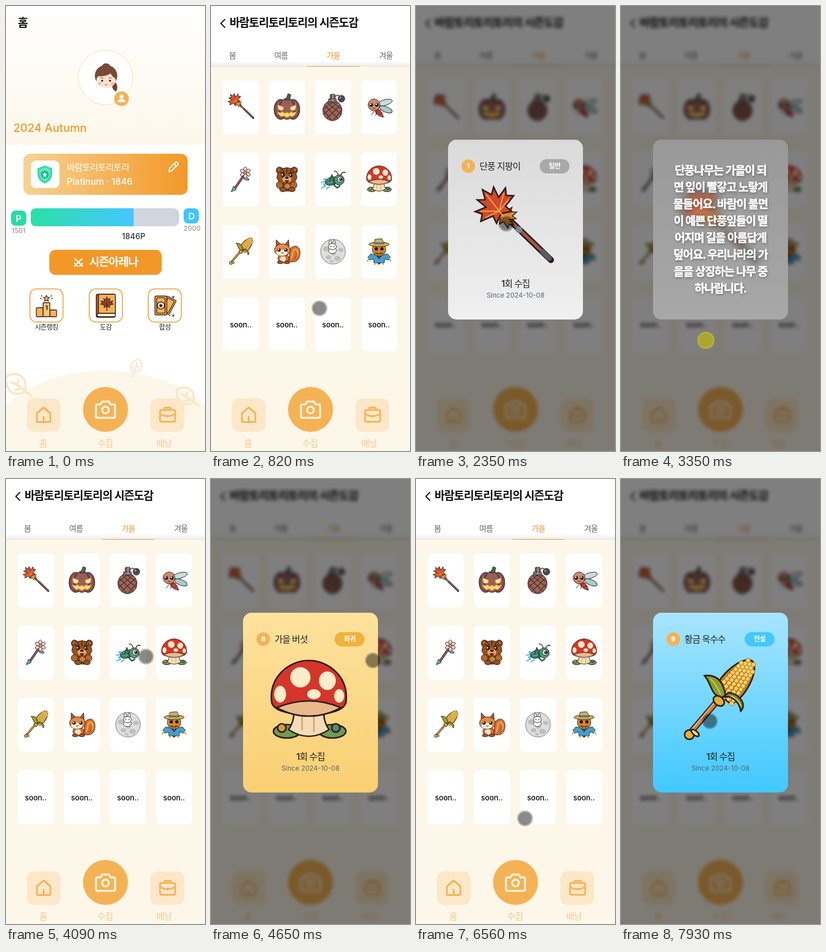
These frames come from a looping animation (354x792 px, 8 s). An HTML page:

```html
<!DOCTYPE html>
<html lang="ko">
<head>
<meta charset="utf-8">
<style>
html, body { margin: 0; width: 100%; height: 100%; overflow: hidden; background: #fff; }
body > * { position: absolute; left: 0; top: 0; width: 354px; height: 792px; }
text { font-family: Inter, "Noto Sans CJK KR", "Noto Sans CJK", sans-serif; white-space: pre; }
#dim { background: rgba(0,0,0,.5); backdrop-filter: blur(3px); }
#back text { stroke: #fff; stroke-width: .5px; filter: drop-shadow(1px 2px 2px rgba(0,0,0,.3)); }
</style>
</head>
<body>
<svg id="home"></svg>
<svg id="dex"></svg>
<div id="dim"></div>
<svg id="modal"></svg>
<svg id="touch"><g id="dot"><circle r="14"/><circle r="11.5"/></g></svg>
<script>
const $ = id => document.getElementById(id);
const INK = '#2b1a18', ORANGE = '#f39828', AMBER = '#f5b255', CREAM = '#fdf7ea';
const USER = '바람토리토리토리';

// ---- drawing helpers
const text = (x, y, s, size, fill, weight = 400, anchor = 'middle') =>
  `<text x="${x}" y="${y + size * .36}" font-size="${size}" fill="${fill}" font-weight="${weight}" text-anchor="${anchor}"${/[가-힣]/.test(s) ? ' letter-spacing="-.055em"' : ''}>${s}</text>`;
const rect = (x, y, w, h, r, fill, more = '') =>
  `<rect x="${x}" y="${y}" width="${w}" height="${h}" rx="${r}" fill="${fill}" ${more}/>`;
const oval = (x, y, rx, ry, fill, more = '') =>
  `<ellipse cx="${x}" cy="${y}" rx="${rx}" ry="${ry}" fill="${fill}" ${more}/>`;
const disc = (x, y, r, fill, more = '') => oval(x, y, r, r, fill, more);
const shape = (d, fill, more = '') => `<path d="${d}" fill="${fill}" ${more}/>`;
const line = (d, color, w = 1) =>
  `<path d="${d}" fill="none" stroke="${color}" stroke-width="${w}" stroke-linecap="round" stroke-linejoin="round"/>`;
const at = (x, y, s, k = 1, turn = 0) =>
  `<g transform="translate(${x} ${y}) scale(${k}) rotate(${turn})">${s}</g>`;
const ring = (n, f) => Array.from({ length: n }, (_, i) => f(i * 360 / n)).join('');
const gradient = (id, a, b, flat) =>
  `<linearGradient id="${id}" x2="${flat ? 1 : 0}" y2="${flat ? 0 : 1}"><stop stop-color="${a}"/><stop offset="1" stop-color="${b}"/></linearGradient>`;
const edge = `stroke="${INK}" stroke-width=".9"`;
const eyes = (x1, x2, y, r) => [x1, x2].map(x => disc(x, y, r, INK) + disc(x - r * .3, y - r * .35, r * .4, '#fff')).join('');

// ---- collectibles, each about 50 units wide around 0,0
const mapleLeaf = 'M0-13L2.500-7 6.500-10 5-3 12-5 9.500-1 13 2 5 4 6 9 0 6-6 9-5 4-13 2-9.500-1-12-5-5-3-6.500-10-2.500-7Z';

const cob = () => {
  let s = shape('M-13-6C-6-10 8-8 14-2.500Q16 0 14 2.500C8 8-6 10-13 6Z', '#c07f1a', edge);
  for (let i = -5; i <= 5; i++)
    for (let j = -3; j <= 3; j++) {
      const x = i * 2.5 + (j % 2 ? 1.2 : 0), y = j * (2.5 - i * .1);
      if (Math.abs(y) < 7.6 - (x + 13) ** 2 * .006) s += oval(x, y, 1.4, 1.3, '#f7d06a', 'stroke="#a86a12" stroke-width=".3"');
    }
  return s;
};

const items = [
  // maple staff
  line('M-7-9L22 19', INK, 3.6) + line('M-6-8L20 17', '#9a5a45', 1.8) + line('M17 14L21 18', '#5a5a68', 3) + disc(3, 1, 2, '#7d8590') +
  at(-5, -7, shape(mapleLeaf, '#e08b34', edge), .55, 70) + at(-11, -13, shape(mapleLeaf, '#cf4a28', edge) + line('M0-9V12M-9-3L0 4 9-3M-9 2L0 4 9 2', '#f09a4a', .8), .95, -38),
  // pumpkin
  oval(-11, 4, 12, 18, '#7b4c50', edge) + oval(11, 4, 12, 18, '#7b4c50', edge) + oval(0, 3, 13, 19, '#96605a', edge) + line('M-15-8Q-19 2-16 14M15-8Q19 2 16 14', '#b07a68', 1.4) +
  shape('M-4-13Q1-18 2-24L7-22Q5-17 6-13Z', '#3f6b45', edge) +
  shape('M-16-4L-6 0Q-5 6-11 6T-16-4ZM16-4L6 0Q5 6 11 6T16-4Z', '#fff0a0', 'stroke="#e0792c" stroke-width="1"') +
  shape('M-17 8L-11 10-8 8-4 11 0 9 4 11 8 8 11 10 17 8Q13 18 8 17L5 15 2 18-2 18-5 15-8 17Q-13 18-17 8Z', '#ffdb6b', 'stroke="#e0792c" stroke-width="1"'),
  // pine cone perfume
  oval(-1, 6, 17, 18, '#9a6656', edge) +
  line('M-15-3L9 20M-10-8L15 13M-4-11L16 4M-17 6L-2 24M13-3L-11 20M8-8L-17 13M2-11L-18 4M15 6L0 24', '#4b2a2a', 1.2) +
  rect(-8, -15, 14, 6, 1, '#77707c', edge) + rect(-5, -23, 9, 8, 2, '#655d62', edge) + line('M0-22V-11', '#d9b98a', 1.4) +
  line('M4-19Q9-24 12-18', '#665', 2) + disc(15, -15, 6, '#4b4b55', edge) + disc(13, -17, 1.6, '#aab'),
  // dragonfly
  oval(10, -8, 14, 5, '#c3dedd', edge + ' transform="rotate(-16 10 -8)"') + oval(12, 4, 12, 5, '#a5cccb', edge + ' transform="rotate(22 12 4)"') +
  shape('M-5 2Q4 4 8 18Q-5 16-8 5Z', '#c4413c', edge) + line('M-4 7L3 5M-1 12L6 10', '#6e1f22') +
  disc(-9, -4, 10.5, '#d08a70', edge) + eyes(-14, -4, -4, 3.2) + line('M-11 2Q-9 4-7 2', INK) + line('M-9 8L-14 14M-4 8L-6 15', INK),
  // flower wand
  line('M-12 18L6-8', INK, 4.2) + line('M-12 18L6-8', '#a05a66', 2.4) + shape('M-13 12L-17 22-8 18Z', '#58b5dd', edge) +
  shape('M4-3Q12-6 15 1Q8 3 4-3Z', '#73a8a2', edge) +
  at(8, -12, ring(6, a => oval(0, -5.5, 3, 5, '#f2d6d3', `${edge} transform="rotate(${a})"`)) + disc(0, 0, 3, '#e2a05a', edge), .95),
  // bear
  oval(1, 11, 14, 10, '#7a4423', edge) + disc(-13, -16, 6, '#7a4423', edge) + disc(13, -16, 6, '#7a4423', edge) + disc(-13, -16, 3, '#c07a3c') + disc(13, -16, 3, '#c07a3c') +
  shape('M-18-3L-16-12-10-19 0-21 10-19 16-12 18-3 14 5 0 9-14 5Z', '#94531f', edge) + line('M-8-18L-5-12M8-18L5-12M0-20V-12', '#5e3015', 2) +
  oval(0, 0, 8, 6, '#e0a562') + oval(0, -3, 3, 2, INK) + eyes(-7, 7, -7, 3) +
  line('M-12-13L-4-10M12-13L4-10', INK, 1.6) + shape('M-4 2Q0 1 4 2Q2 7 0 7T-4 2Z', '#6e1f22') +
  oval(-13, 10, 6, 6, '#b06a2c', edge) + oval(12, 10, 6, 6, '#b06a2c', edge) + oval(-7, 18, 6, 4, '#94531f', edge) + oval(9, 18, 6, 4, '#94531f', edge) + oval(1, 12, 5, 4, '#c98546'),
  // cricket
  line('M-8 0L-16-1-12 4-21 5M-8 8L-17 8-13 12-20 15M-6 13L-12 17', '#40aee8', 1.8) +
  oval(-2, 3, 12, 7, '#3d8068', `${edge} transform="rotate(-18 -2 3)"`) + line('M-10 1L7-3M-9 6L4 4', '#7cc4a4', 1) + line('M-6 3L-2-8 3 9M0 8L7 15 12 12', '#275c4a', 2.4) +
  disc(11, 1, 9, '#4a9a80', edge) + disc(13, 0, 5, '#e8f5ee', edge) + disc(14, 0, 3, INK) + disc(13, -1, 1, '#fff') + line('M9-8Q8-15 2-15M14-8Q17-15 22-12', INK, 1.4),
  // mushroom
  oval(-13, 18, 8, 4, '#6f9a57', edge) + oval(14, 18, 8, 4, '#6f9a57', edge) +
  shape('M-10 0Q-7 10-12 17Q0 25 12 17Q7 10 10 0Z', '#f6dcb6', edge) + line('M-4 6V17M3 5V18', '#d3a87c') +
  shape('M-22 1C-24-14-12-24 0-24S24-14 22 1Q20 8 0 8T-22 1Z', '#d5352a', edge) + shape('M-19 4Q0-4 19 4Q10 9 0 9T-19 4Z', '#e9b98c', edge) +
  oval(-5, -14, 6, 6, '#ffecc8') + oval(11, -12, 5, 5.5, '#ffecc8') + oval(-17, -4, 3.5, 5, '#ffecc8') + oval(3, -4, 4, 3, '#ffecc8') + oval(18, -3, 3, 4, '#ffecc8') +
  disc(-16, 16, 2.5, '#d99b3c', edge) + disc(16, 16, 2.5, '#4f8a72', edge),
  // golden corn
  line('M0-1L-17 19', INK, 3.6) + line('M0-1L-17 19', '#c8803f', 2.4) + line('M-1-1L-16 17', '#e8b075', .7) +
  at(10.5, -12, cob(), 1, -52) +
  shape('M2-2C-5-3-4-10-8.500-15C0-16 3-10 4-3Z', '#8d9c2b', edge) + shape('M2-2C7-4 12 0 13 6C17 2 12-4 6-5Z', '#7c8c22', edge) + line('M1-4Q-2-11-5-13M7-3Q12-1 13 3', '#c9cf5c', .7) +
  oval(0, 0, 3.6, 2.6, '#e2ae35', `${edge} transform="rotate(40)"`) + at(-17.5, 20, disc(0, 0, 2.8, '#e5b038', edge) + oval(2, -3, 2.8, 1.3, '#f5d367', `${edge} transform="rotate(40)"`)),
  // squirrel
  shape('M2 17C8 12 0-2 9-8S25-6 23 6S13 20 2 17Z', '#d4702e', edge) + line('M8 12C12 4 9-2 14-4S21 2 18 8', '#f0a050', 3) + line('M13 13Q18 9 17 3', '#a84f22', 1.4) +
  oval(-6, 12, 10, 8, '#d4702e', edge) + oval(-7, 13, 5, 6, '#fbe6c8') + shape('M-19-9L-19-21-11-13ZM-3-13L3-21 4-9Z', '#b35a2b', edge) +
  oval(-8, -3, 14, 11, '#e58a45', edge) + oval(-9, 2, 10, 5.5, '#fdebd2') + eyes(-14, -2, -3, 3) + line('M-10 2Q-8 4-6 2', INK) + oval(-12, 19, 5, 2.5, '#a84f22', edge) + oval(0, 19, 5, 2.5, '#a84f22', edge),
  // moon
  disc(0, 0, 22, '#dededc', 'stroke="#777" stroke-width="1"') +
  [[-12, -5, 6], [-8, 10, 5], [8, 12, 6], [14, -3, 5], [1, 4, 4], [-2, 17, 3]].map(c => oval(c[0], c[1], c[2], c[2] * .75, '#bbbfc0')).join('') +
  at(-1, -8, oval(-4, -8, 2, 5, '#fff', edge) + oval(3, -8, 2, 5, '#fff', edge) + oval(0, 6, 7, 5.5, '#fff', edge) + oval(0, -1, 7, 5.5, '#fff', edge) + eyes(-2.7, 2.7, -1, 1)),
  // scarecrow
  line('M0 5V21', '#5b3824', 4) + shape('M-15 4L-20 10-17 15-10 13-9 20 9 20 10 13 17 15 20 10 15 4Q0 8-15 4Z', '#3fa0d4', edge) +
  line('M-18 12L-21 17M18 12L21 17M-6 20L-8 23M6 20L8 23', '#d5a336', 2) + shape('M-7 4L0 10 7 4 0 13Z', '#bd4531', edge) +
  disc(0, -4, 12, '#d3892f', edge) + disc(-5, -5, 3, INK) + disc(5, -5, 3, INK) + line('M-7 2Q0 6 7 2M-3 2V5M3 2V5', INK, 1.2) +
  oval(0, -13, 18, 4, '#e0ac44', edge) + shape('M-9-14L-7-22 5-23 9-14Z', '#e0ac44', edge) + line('M-8-15H8', '#2f7fb3', 3)
];

// ---- shared bottom bar
const nav =
  rect(37, 698, 60, 60, 13, '#fce8c8') + rect(257, 698, 60, 60, 13, '#fce8c8') + disc(177, 718, 40, AMBER) +
  line('M55 725L67 714.500 79 725V738Q79 740.500 76.500 740.500H57.500Q55 740.500 55 738ZM67 740V731', AMBER, 3) +
  line('M276 719H298Q301 719 301 722V737Q301 740 298 740H277Q274 740 274 737V722Q274 719 276 719M282 719V715H293V719M274 726Q287 734 301 726M287 729V731', AMBER, 3) +
  line('M163 709H168L171 704H183L186 709H191Q194 709 194 712V730Q194 733 191 733H163Q160 733 160 730V712Q160 709 163 709Z', '#fff3df', 3.6) +
  disc(177, 719, 6, 'none', 'stroke="#fff3df" stroke-width="3.6"') +
  text(66, 778, '홈', 16, '#f5c98a') + text(176, 778, '수집', 16, '#f5c98a') + text(281, 778, '배낭', 16, '#f5c98a');

// ---- home page
const leaf = line('M-20-12C-4-22 16-16 14 6C14 12 10 16 4 16C-14 18-18 6-20-12ZM-10-4Q6 4 24 20M0 2L2-8M6 8L-4 10', '#fbe5c6', 3.6);
const girl =
  shape('M12 4Q24 14 18 25Q11 24 10 12Z', '#704334') + disc(0, -17, 8, '#7a4a39') + oval(0, -3, 20, 19, '#7a4a39') + oval(0, 5, 17, 14, '#fde3d0') +
  shape('M-18 3Q-17-14 0-15Q17-14 18 3Q11-1 8-7Q0-1-14-2Z', '#7a4a39') + disc(-7, 6, 1.8, INK) + disc(7, 6, 1.8, INK) +
  line('M-10 1H-5M5 1H10M-2 13Q0 14 2 13', '#704334', 1) + disc(-11, 11, 2.5, '#f8b8a4') + disc(11, 11, 2.5, '#f8b8a4');
const star = 'M0-6L2-2 6-1.500 3 1.500 4 6 0 4-4 6-3 1.500-6-1.500-2-2Z';
const iconEdge = `stroke="${INK}" stroke-width="1.300"`;
const podium = rect(-18, 4, 12, 16, 1, AMBER, iconEdge) + rect(6, 8, 12, 12, 1, AMBER, iconEdge) + rect(-6, -5, 12, 25, 1, '#f8c471', iconEdge) +
  text(0, 4, '1', 11, INK, 700) + at(0, -13, shape(star, AMBER, iconEdge), .85) + line('M-11-13L-9-12M11-13L9-12M-9-18L-8-16M9-18L8-16', INK, 1.2);
const book = rect(-17, -20, 34, 41, 3, '#a85f32', iconEdge) + rect(-13, -20, 30, 34, 2, AMBER, iconEdge) + rect(-15, 14, 32, 6, 2, '#fff0d2', iconEdge) +
  at(2, -4, shape(mapleLeaf, '#8c3f2b', edge), .9) + line('M2-3V9', INK, 1.3);
const ticket = rect(-10, -16, 20, 32, 2, AMBER, iconEdge) + rect(-7, -13, 14, 26, 1, 'none', iconEdge);
const tickets = at(6, 0, ticket, .9, 28) + at(-7, 0, ticket + disc(0, 0, 6, '#fff0d2', iconEdge) + at(0, 0, shape(star, INK), .6), 1.050) +
  line('M15-17V-13M13-15H17M15 16V20M13 18H17', INK, 1.2) + disc(9, 18, 1, INK);
const tile = (x, icon, label) => rect(x - 29.5, 503.5, 59, 59, 12, '#fff', `stroke="${ORANGE}" stroke-width="1.500"`) + at(x, 533, icon) + text(x, 572, label, 12, '#222');

$('home').innerHTML =
  gradient('sky', '#fff', '#fdf7ea') + gradient('gold', '#f7d292', ORANGE, 1) + gradient('bar', '#2be0a6', '#45c6ff', 1) +
  rect(0, 0, 354, 792, 0, '#fff') + rect(0, 0, 354, 247, 0, 'url(#sky)') +
  text(21, 30, '홈', 20, '#111', 600, 'start') +
  disc(177, 127, 48.5, '#fff', 'stroke="#fadcaa" stroke-width="1"') + at(178, 127, girl) +
  disc(205.5, 165, 13, AMBER) + disc(205.5, 161, 3.5, '#fff') + shape('M198.500 171Q198.500 165.500 205.500 165.500T212.500 171Z', '#fff') +
  text(13, 217, '2024 Autumn', 20, ORANGE, 500, 'start') +
  rect(31, 263, 292, 73, 12, 'url(#gold)') + rect(44, 275, 51, 49, 9, '#fff') +
  shape('M69 284L82 289V300Q81 311 69 316Q57 311 56 300V289Z', '#2edaa5') + shape('M69 287L79 291V300Q78 308 69 313Q60 308 59 300V291Z', '#63e6bd') +
  disc(69, 300, 7, '#22b58c') + at(69, 300, shape(star, '#d5fff0'), .75) +
  text(108, 287, USER, 16, '#fff', 500, 'start') + text(108, 312, 'Platinum · 1846', 16, '#fff', 500, 'start') +
  line('M290 295L291 289 302 278Q304 277 306 280Q307 282 305 283L295 293ZM299 281L303 285', '#fff', 2) +
  rect(9, 364, 27, 27, 8, '#2adba5') + text(22.5, 378, 'P', 16, '#fff', 600) + text(22.5, 400, '1501', 12, '#888') +
  rect(316, 360, 27, 27, 8, '#43c5fc') + text(330, 374, 'D', 16, '#fff', 500) + text(331, 396, '2000', 12, '#888') +
  rect(44, 360, 264, 32, 10, '#d1d5dd') + shape('M227 360V392H54Q44 392 44 382V370Q44 360 54 360Z', 'url(#bar)') +
  text(227, 410, '1846P', 14, '#333', 500) +
  rect(77, 434, 200, 44.5, 11, ORANGE) + line('M123 450L134 461M135 450L124 461M122 458L127 463M136 458L131 463M122 463L124 461M136 463L134 461', '#fff', 2.4) +
  text(148, 456, '시즌아레나', 20, '#fff', 700, 'start') +
  tile(72, podium, '시즌랭킹') + tile(177.5, book, '도감') + tile(282.5, tickets, '합성') +
  oval(177, 790, 215, 141, CREAM) +
  at(20, 673, leaf, 1.050) + at(232, 642, leaf, .62, 75) + at(321, 694, leaf, .9) + nav;

// ---- collection page
const cardX = i => 53 + 82 * (i % 4), cardY = i => 180.5 + 128.6 * (i / 4 | 0);
let cards = '';
for (let i = 0; i < 16; i++) {
  const x = cardX(i), y = cardY(i);
  cards += rect(x - 32, y - 48, 64, 96, 8, '#fff') + (items[i] ? at(x, y - .5, items[i]) : text(x, y + 1, 'soon..', 13, '#000', 500));
}
$('dex').innerHTML =
  gradient('shade', '#fff', '#eeeeef') +
  rect(0, 0, 354, 792, 0, CREAM) + rect(0, 0, 354, 107, 0, '#fff') + rect(0, 97, 354, 10, 0, 'url(#shade)') + rect(0, 107, 354, 1, 0, '#e9e5dd') +
  line('M24.500 24L17.500 31 24.500 38', '#111', 2) + text(33, 30, USER + '의 시즌도감', 20, '#111', 600, 'start') +
  ['봄', '여름', '가을', '겨울'].map((s, i) => text([38, 124.5, 217.5, 311][i], 88, s, 14, i == 2 ? '#e8922c' : '#666')).join('') +
  rect(171, 107, 93, 1, 0, '#d99a4e') + cards + nav;

// ---- item cards: [open, flip, close, item, name, rarity, colours, back text]
const popups = [
  [1850, 2480, 3480, 0, '단풍 지팡이', '일반', ['#dadada', '#f0f0f0', '#a9a9a9'],
    '단풍나무는 가을이 되|면 잎이 빨갛고 노랗게|물들어요. 바람이 불면|이 예쁜 단풍잎들이 떨|어지며 길을 아름답게|덮어요. 우리나라의 가|을을 상징하는 나무 중|하나랍니다.'],
  [4580, 5470, 6560, 7, '가을 버섯', '희귀', ['#fde29d', '#f9cf72', '#f0b23c'],
    '가을이 되면 숲속에서|다양한 종류의 버섯이|자라나요. 버섯은 비가|온 후에 더 잘 자라기|때문에 가을 장마가 끝|나고 나면 숲에서 버섯|을 찾을 수 있어요. 일|부 버섯은 먹을 수도 있|지만, 독버섯은 조심해|야 해요!'],
  [7390, 9000, 9000, 8, '황금 옥수수', '전설', ['#a8e5ff', '#41c8ff', '#41c8ff'], '']
];

function showPopup([, , , n, name, rarity, [top, bottom, pill], story], flipped) {
  const lines = story.split('|'), art = at(174, 395, items[n], 3);
  const front = art + disc(93, 285, 12, AMBER) + text(93, 285, String(n + 1), 12, '#fff', 800) +
    text(113, 285, name, 16, '#222', 500, 'start') + rect(220, 272.5, 53, 25.5, 12.7, pill) + text(246.5, 285, rarity, 12, '#fff', 700) +
    text(177, 494, '1회 수집', 16, '#222', 500) + text(177, 515, 'Since 2024-10-08', 12, '#55666e');
  const back = rect(57, 238, 240, 320, 15, 'rgba(0,0,0,.3)') + `<g style="filter:blur(7px);opacity:.75">${art}</g>` +
    `<g id="back">${lines.map((s, i) => text(177, 398 + 30 * (i - (lines.length - 1) / 2), s, 20, '#fff', 700)).join('')}</g>`;
  $('modal').innerHTML = gradient('face', top, bottom) + rect(57, 238, 240, 320, 15, 'url(#face)') + (flipped ? back : front);
}

// ---- touch path: [start, end, x, y]
const moves = [
  [0, 0, 334, 778], [70, 210, 193, 538], [860, 1360, 63, 177], [1960, 2400, 164, 395], [2810, 3090, 151, 595],
  [3680, 4090, 249, 316], [4090, 4300, 288, 323], [4860, 5200, 211, 420], [5750, 6090, 194, 604],
  [6700, 7080, 66, 442], [7660, 7920, 158, 431]
];
const presses = [[410, 610], [1710, 1850], [2410, 2480], [3340, 3480], [4440, 4580], [5400, 5470], [6490, 6560], [7320, 7390]];
const ease = p => p * p * (3 - 2 * p);

function moveTouch(t) {
  let x = 0, y = 0;
  for (const [a, b, mx, my] of moves) {
    if (t < a) break;
    const k = b > a ? ease(Math.min(1, (t - a) / (b - a))) : 1;
    x += (mx - x) * k;
    y += (my - y) * k;
  }
  const down = presses.some(([a, b]) => t >= a && t < b);
  const [halo, core] = $('dot').children;
  $('touch').style.display = t < 70 ? 'none' : '';
  $('dot').setAttribute('transform', `translate(${x} ${y}) scale(${down ? 1.08 : 1})`);
  halo.setAttribute('fill', down ? 'rgba(205,200,30,.72)' : 'rgba(0,0,0,.27)');
  core.setAttribute('fill', down ? 'rgba(150,145,30,.4)' : 'rgba(0,0,0,.26)');
}

let shown = '';
function draw(now) {
  const t = now % 8000;
  const popup = popups.find(p => t >= p[0] && t < p[2]);
  const flipped = !!popup && t >= popup[1];
  const state = popup ? popup[4] + flipped : '';
  if (state !== shown && popup) showPopup(popup, flipped);
  shown = state;
  $('home').style.display = t < 610 ? '' : 'none';
  $('dex').style.display = t < 610 ? 'none' : '';
  $('dim').style.display = $('modal').style.display = popup ? '' : 'none';
  moveTouch(t);
}

const begin = performance.now();
function frame() {
  draw(performance.now() - begin);
  requestAnimationFrame(frame);
}
frame();
</script>
</body>
</html>
```
